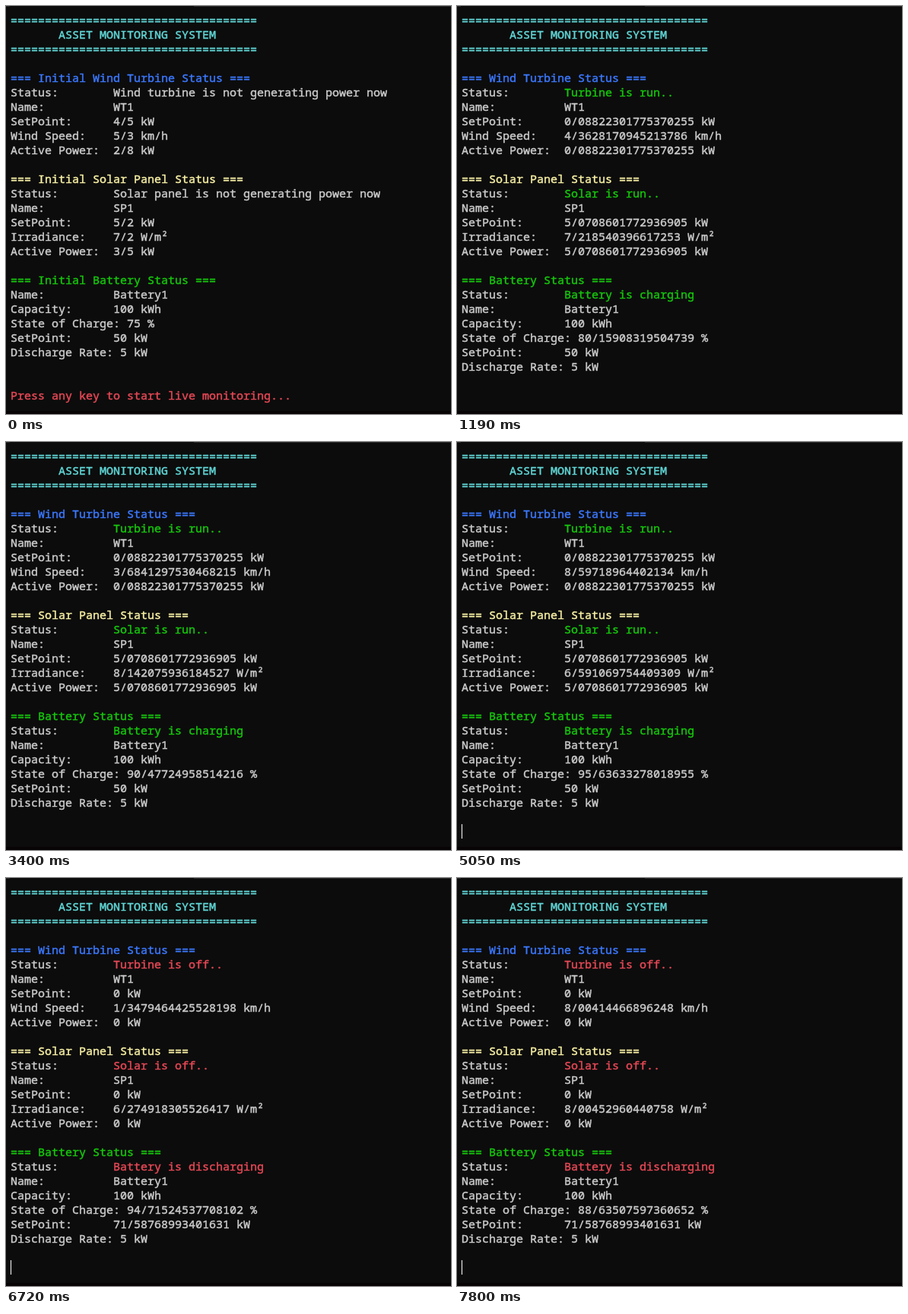
Animation of 585x537 px, one loop 8 s. Source, as an HTML page with a canvas:

```html
<!DOCTYPE html>
<html lang="en">
<head>
<meta charset="utf-8">
<title>Asset monitoring system</title>
<style>
html, body { margin: 0; height: 100%; overflow: hidden; background: #0c0c0c; }
canvas { display: block; }
</style>
</head>
<body>
<canvas width="585" height="537"></canvas>
<script>
const ctx = document.querySelector('canvas').getContext('2d');
const LOOP = 8000, LEFT = 6, TOP = 9, LINE = 19, LAST_ROW = 26;
const GREY = '#cccccc', CYAN = '#61d6d6', BLUE = '#3b78ff', YELLOW = '#f9f1a5',
      GREEN = '#16c60c', RED = '#e74856';

const rule = ['='.repeat(36), CYAN];
const heading = (name, color) => [`=== ${name} Status ===`, color];
const field = (label, value, color = GREY) => [label.padEnd(15), GREY, value, color];

// Each line is [text, color, text, color, ...]
function screen({ prefix = '', color = GREEN, wind, solar, battery, footer }) {
  const [windStatus, windSet, speed, windPower = windSet] = wind;
  const [solarStatus, solarSet, irradiance, solarPower = solarSet] = solar;
  const [batteryStatus, charge, batterySet = '50'] = battery;
  const lines = [
    rule, ['       ASSET MONITORING SYSTEM', CYAN], rule, [],
    heading(prefix + 'Wind Turbine', BLUE),
    field('Status:', windStatus, color),
    field('Name:', 'WT1'),
    field('SetPoint:', windSet + ' kW'),
    field('Wind Speed:', speed + ' km/h'),
    field('Active Power:', windPower + ' kW'), [],
    heading(prefix + 'Solar Panel', YELLOW),
    field('Status:', solarStatus, color),
    field('Name:', 'SP1'),
    field('SetPoint:', solarSet + ' kW'),
    field('Irradiance:', irradiance + ' W/m²'),
    field('Active Power:', solarPower + ' kW'), [],
    heading(prefix + 'Battery', GREEN),
    ...(batteryStatus ? [field('Status:', batteryStatus, color)] : []),
    field('Name:', 'Battery1'),
    field('Capacity:', '100 kWh'),
    [`State of Charge: ${charge} %`, GREY],
    field('SetPoint:', batterySet + ' kW'),
    ['Discharge Rate: 5 kW', GREY],
  ];
  if (footer) lines[LAST_ROW] = [footer, RED];
  return lines;
}

const running = (speed, irradiance, charge) => screen({
  wind: ['Turbine is run..', '0/08822301775370255', speed],
  solar: ['Solar is run..', '5/0708601772936905', irradiance],
  battery: ['Battery is charging', charge],
});

const stopped = (speed, irradiance, charge) => screen({
  color: RED,
  wind: ['Turbine is off..', '0', speed],
  solar: ['Solar is off..', '0', irradiance],
  battery: ['Battery is discharging', charge, '71/58768993401631'],
});

const initial = screen({
  prefix: 'Initial ', color: GREY,
  wind: ['Wind turbine is not generating power now', '4/5', '5/3', '2/8'],
  solar: ['Solar panel is not generating power now', '5/2', '7/2', '3/5'],
  battery: ['', '75'],
  footer: 'Press any key to start live monitoring...',
});
const started = screen({
  wind: ['Wind turbine is generating power', '4/5', '2/7311304450456655', '2/7311304450456655'],
  solar: ['Solar panel is generating power', '5/2', '8/809319305357146'],
  battery: ['Battery is not connect to any of assets until now', '75'],
});
const firstStop = stopped('1/3479464425528198', '6/274918305526417', '94/71524537708102');

const scenes = [
  [0, initial],
  [70, []],
  [140, started],
  [1130, running('4/3628170945213786', '7/218540396617253', '80/15908319504739')],
  [2130, running('9/995374523030355', '7/601176459542467', '85/31816639009477')],
  [3130, running('3/6841297530468215', '8/142075936184527', '90/47724958514216')],
  [4130, running('8/59718964402134', '6/591069754409309', '95/63633278018955')],
  [5130, running('6/128450397261584', '7/935162048317529', '100/7954159752369')],
  [6120, firstStop.slice(0, 12)],
  [6190, firstStop],
  [7110, []],
  [7180, stopped('8/00414466896248', '8/00452960440758', '88/63507597360652')],
];

// The cursor flips at each of these times, starting hidden
const blinks = [70, 670, 1130, 1190, 1740, 2330, 2860, 3400, 3990, 4520,
                5050, 5590, 6120, 6190, 6720, 7250, 7800];

function rect(color, x, y, w, h) {
  ctx.fillStyle = color;
  ctx.fillRect(x, y, w, h);
}

function drawLine(line, row) {
  const y = TOP + row * LINE + 15;
  let x = LEFT;
  for (let i = 0; i < line.length; i += 2) {
    ctx.fillStyle = ctx.strokeStyle = line[i + 1];
    ctx.fillText(line[i], x, y);
    ctx.strokeText(line[i], x, y);
    x += ctx.measureText(line[i]).width;
  }
}

function draw(now) {
  const t = now % LOOP;
  const [start, lines] = scenes.findLast(([from]) => from <= t);

  rect('#0c0c0c', 0, 0, 585, 537);
  rect('#2a2a2a', 0, 0, 5, 1);
  rect('#2a2a2a', 247, 0, 338, 1);
  rect('#080305', 0, 533, 585, 4);

  // A hairline stroke thickens the regular weight to a terminal-like stem
  ctx.font = '15px "Noto Sans Mono", "DejaVu Sans Mono", monospace';
  ctx.lineWidth = 0.45;
  ctx.lineJoin = 'round';
  lines.forEach(drawLine);

  if (start === 7110) rect('#0c2a0c', LEFT, TOP + 12 * LINE, 1, LINE);
  if (blinks.filter(b => b <= t).length % 2) {
    const row = start === 6120 ? lines.length : LAST_ROW;
    rect('#ffffff', LEFT, TOP + row * LINE, 1, LINE);
  }
}

const origin = performance.now();
function tick() {
  draw(performance.now() - origin);
  requestAnimationFrame(tick);
}
tick();
</script>
</body>
</html>
```
